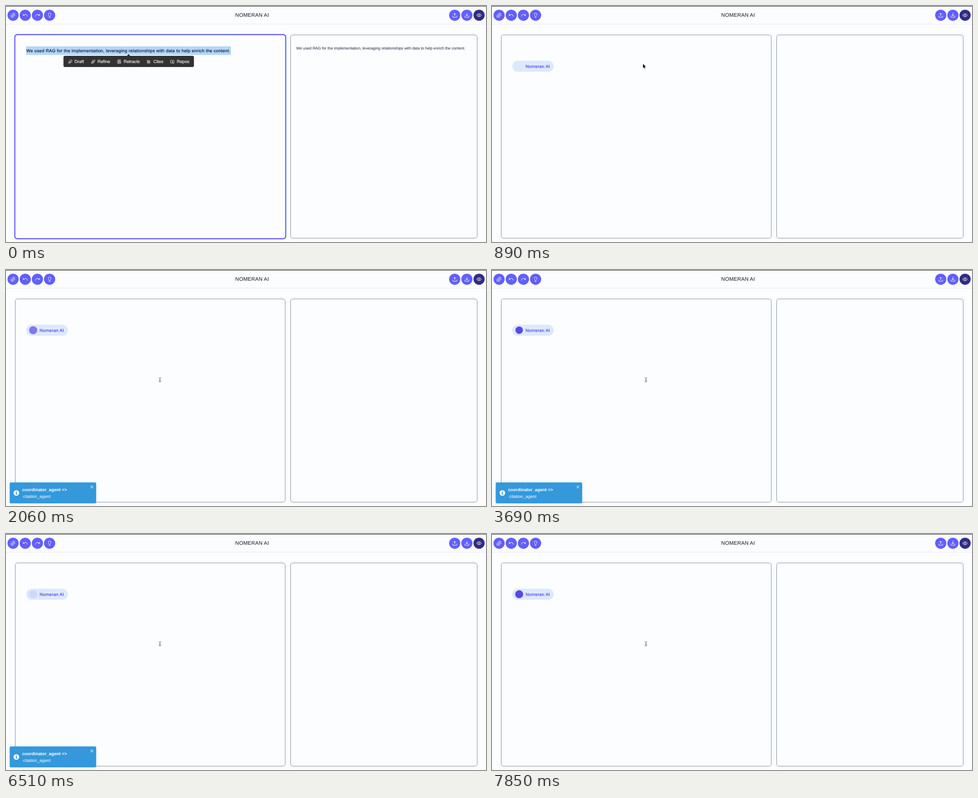
Write an HTML page with a canvas that moves like this. It is 1065 px wide and 526 px high and loops after 8 s.

```html
<!DOCTYPE html>
<html lang="en">
<head>
<meta charset="utf-8">
<title>Editor</title>
<style>
  html, body { margin: 0; width: 100%; height: 100%; overflow: hidden; background: #fbfdff; }
  canvas { display: block; }
</style>
</head>
<body>
<canvas id="stage" width="1065" height="526"></canvas>
<script>
const ctx = document.getElementById('stage').getContext('2d');
const LOOP = 8000, STEP = 148;
const FONT = '"Liberation Sans", Arial, sans-serif';
const INDIGO = '#615fff', SLATE = '#7c8aa1', PAPER = '#fbfdff';
const SENTENCE = 'We used RAG for the implementation, leveraging relationships with data to help enrich the content.';

// Line icons on a 24-unit grid
const ICONS = {
  clip: 'm21.4 11-9.2 9.2a6 6 0 0 1-8.5-8.5l8.6-8.5A4 4 0 1 1 18 8.8l-8.6 8.6a2 2 0 0 1-2.8-2.8l8.5-8.5',
  undo: 'M3 7v6h6M21 17a9 9 0 0 0-9-9 9 9 0 0 0-6 2.3L3 13',
  redo: 'M21 7v6h-6M3 17a9 9 0 0 1 9-9 9 9 0 0 1 6 2.3l3 2.7',
  bulb: 'M15 14c.2-1 .7-1.7 1.5-2.5 1-.9 1.5-2.2 1.5-3.5A6 6 0 0 0 6 8c0 1 .2 2.2 1.5 3.5.7.7 1.3 1.5 1.5 2.5M9 18h6M10 22h4',
  upload: 'M21 15v4a2 2 0 0 1-2 2H5a2 2 0 0 1-2-2v-4M17 8l-5-5-5 5M12 3v12',
  download: 'M21 15v4a2 2 0 0 1-2 2H5a2 2 0 0 1-2-2v-4M7 10l5 5 5-5M12 15V3',
  eye: 'M2 12a10.8 10.8 0 0 1 20 0 10.8 10.8 0 0 1-20 0M9 12a3 3 0 1 0 6 0 3 3 0 1 0-6 0',
  feather: 'M12.7 19a2 2 0 0 0 1.4-.6l6.1-6.2a6 6 0 0 0-8.5-8.5L5.6 9.9A2 2 0 0 0 5 11.3V19zM16 8 2 22M17.5 15H9',
  spark: 'M11 4l2 7 7 2-7 2-2 7-2-7-7-2 7-2zM20 2v5M22.5 4.5h-5M4 18v4M6 20H2',
  book: 'M4 19.5v-15A2.5 2.5 0 0 1 6.5 2H20v20H6.5a2.5 2.5 0 0 1 0-5H20M9.5 8a2.5 2.5 0 1 0 5 0 2.5 2.5 0 1 0-5 0M8 14a4 4 0 0 1 8 0',
  cite: 'M2 4l5 5M8 3l2 5M3 11h6M9 9l11-3-3 5 4 4H10zM8 14l-4 6h6l2-4M15 16l5 5M13 17v5',
  repo: 'M9 20H4a2 2 0 0 1-2-2V5a2 2 0 0 1 2-2h4l3 3h9a2 2 0 0 1 2 2v5M11 12a2 2 0 1 0 4 0 2 2 0 1 0-4 0M13 14v8M13 16c0 3 3 3 5 3M18 19a2 2 0 1 0 4 0 2 2 0 1 0-4 0'
};
for (const k in ICONS) ICONS[k] = new Path2D(ICONS[k]);

const ARROW = new Path2D('M0 0v9.2l2.1-2 1.5 3.3 1.5-.7-1.4-3.2h2.8z');
const HAND = new Path2D('M-1 .8Q0-.6 1 .8V5l4 .8q1.4.4 1.2 2L5.4 12H-.6L-4 7.4q.6-1.6 3 .4z');

ctx.textRendering = 'geometricPrecision';

function box(x, y, w, h, r, fill, stroke, line = 1) {
  ctx.beginPath();
  ctx.roundRect(x, y, w, h, r);
  if (fill) { ctx.fillStyle = fill; ctx.fill(); }
  if (stroke) { ctx.strokeStyle = stroke; ctx.lineWidth = line; ctx.stroke(); }
}

function disc(x, y, r, fill) {
  ctx.beginPath();
  ctx.arc(x, y, r, 0, Math.PI * 2);
  ctx.fillStyle = fill;
  ctx.fill();
}

function text(str, x, y, size, color, { spacing = 0, weight = 400, align = 'left', heavy = 0 } = {}) {
  ctx.font = `${weight} ${size}px ${FONT}`;
  ctx.letterSpacing = spacing + 'px';
  ctx.textAlign = align;
  ctx.fillStyle = color;
  ctx.fillText(str, x, y);
  if (heavy) {
    ctx.strokeStyle = color;
    ctx.lineWidth = heavy;
    ctx.strokeText(str, x, y);
  }
}

function icon(name, cx, cy, size, line = 2) {
  ctx.save();
  ctx.translate(cx - size / 2, cy - size / 2);
  ctx.scale(size / 24, size / 24);
  ctx.strokeStyle = '#fff';
  ctx.lineWidth = line;
  ctx.lineCap = ctx.lineJoin = 'round';
  ctx.stroke(ICONS[name]);
  ctx.restore();
}

function buttons(names, left) {
  names.forEach((name, i) => {
    const x = left + 27 * i;
    disc(x, 20.6, 12.4, name === 'eye' ? '#312c85' : INDIGO);
    icon(name, x, 20.6, 12);
  });
}

function header() {
  ctx.fillStyle = '#2e2e33';
  ctx.fillRect(0, 0, 1065, 1);
  ctx.fillStyle = '#e3e8f0';
  ctx.fillRect(0, 40, 1065, 1);
  buttons(['clip', 'undo', 'redo', 'bulb'], 15.7);
  buttons(['upload', 'download', 'eye'], 995.6);
  text('NOMERAN AI', 546, 24.3, 11.6, '#15171f', { spacing: 0.2, align: 'center' });
}

function panes(focused) {
  if (focused) box(19.6, 63.8, 601, 455, 5.5, null, INDIGO, 2.4);
  else box(20.5, 64.5, 599, 453, 5, null, SLATE);
  box(631.5, 64.5, 414, 453, 5, null, SLATE);
}

function menu(hover) {
  ctx.beginPath();
  ctx.moveTo(267.5, 112);
  ctx.lineTo(272, 107.2);
  ctx.lineTo(276.5, 112);
  ctx.fillStyle = '#333';
  ctx.fill();
  box(127.5, 111, 289.5, 25, 3.6, '#333');
  if (hover) box(307, 116, 47.5, 16, 2.5, `rgba(255,255,255,${0.16 * hover})`);
  const items = [['feather', 'Draft', 142.5, 152], ['spark', 'Refine', 193.5, 203],
    ['book', 'Retracts', 251, 261], ['cite', 'Cites', 316.5, 327], ['repo', 'Repos', 369, 379]];
  for (const [name, label, ix, tx] of items) {
    icon(name, ix, 124, 9.6);
    text(label, tx, 127.3, 9.66, '#fff', { heavy: 0.15 });
  }
}

function editing(t) {
  panes(true);
  ctx.fillStyle = '#b3d6fd';
  ctx.fillRect(45, 90, 454, 19);
  text(SENTENCE, 45, 103, 9.66, '#0b0d14', { spacing: 0.316, heavy: 0.15 });
  text(SENTENCE, 644, 97.4, 8.6, '#1d2436');
  menu(Math.min(1, t / 444));
  if (t >= STEP) pointer(HAND, 335, 129);
}

function pointer(path, x, y) {
  const hand = path === HAND;
  ctx.save();
  ctx.translate(x, y);
  ctx.lineJoin = 'round';
  ctx.lineWidth = 0.9;
  ctx.strokeStyle = hand ? '#111' : '#fff';
  ctx.fillStyle = hand ? '#fff' : '#111';
  ctx.stroke(path);
  ctx.fill(path);
  ctx.restore();
}

function beam(x, y) {
  ctx.beginPath();
  for (const side of [-2.5, 2.5]) {
    for (const end of [-1, 1]) {
      ctx.moveTo(x + side, y + 4.6 * end);
      ctx.quadraticCurveTo(x, y + 4.6 * end, x, y + 3 * end);
    }
  }
  ctx.moveTo(x, y - 3);
  ctx.lineTo(x, y + 3);
  ctx.moveTo(x - 1.5, y + 1.5);
  ctx.lineTo(x + 1.5, y + 1.5);
  ctx.strokeStyle = '#333';
  ctx.lineWidth = 0.8;
  ctx.stroke();
}

// The mark grows from its centre, then fades, every two seconds
function pill(t) {
  box(45, 122, 92, 24.5, 12.25, '#dce9fd');
  text('Nomeran AI', 74.5, 137.5, 9.66, '#432dd7', { spacing: 0.32, heavy: 0.1 });
  if (t < 1030) return;
  const p = ((t - 1032) % 2000) / 1000;
  const r = 0.6 + 8.4 * Math.sin(Math.min(1, p / 0.9) * Math.PI / 2);
  ctx.globalAlpha = p < 0.9 ? 1 : Math.max(0, (1.75 - p) / 0.85) ** 2;
  disc(60.3, 134.2, r, '#5a48e6');
  ctx.globalAlpha = 1;
}

function toast(dx) {
  ctx.save();
  ctx.translate(dx, 0);
  ctx.shadowColor = 'rgba(0,0,0,0.13)';
  ctx.shadowBlur = 7;
  ctx.shadowOffsetY = 0.8;
  box(8.3, 473.5, 191.7, 46.5, 2.4, '#3498db');
  ctx.shadowColor = 'transparent';
  disc(23, 497, 6.2, '#fff');
  ctx.fillStyle = '#3498db';
  ctx.fillRect(22.1, 493, 1.8, 1.7);
  ctx.fillRect(21.4, 495.8, 2.5, 1.2);
  ctx.fillRect(22.2, 495.8, 1.7, 4.6);
  ctx.fillRect(21.2, 499.3, 3.7, 1.2);
  text('coordinator_agent =>', 35.7, 492.8, 9.75, '#fff', { weight: 700 });
  text('citation_agent', 38, 507.8, 9.75, '#fff');
  ctx.beginPath();
  ctx.moveTo(187.7, 480.7); ctx.lineTo(193.3, 486.3);
  ctx.moveTo(193.3, 480.7); ctx.lineTo(187.7, 486.3);
  ctx.strokeStyle = '#d6ebf8';
  ctx.lineWidth = 1.1;
  ctx.stroke();
  ctx.restore();
}

function working(t) {
  panes(false);
  pill(t);
  if (t < 1030) {
    pointer(ARROW, 335, 129);
  } else {
    const k = Math.min(1, (t - 888) / 592);
    const e = k * k * (3 - 2 * k);
    beam(335 + 6.6 * e, 134 + 110.8 * e);
  }
  if (t >= 1332 && t < 7690) toast(t < 1480 || t >= 7540 ? 13 : 0);
}

function draw(now) {
  const t = Math.min(53, Math.floor((now % LOOP + 12) / STEP)) * STEP;
  ctx.fillStyle = PAPER;
  ctx.fillRect(0, 0, 1065, 526);
  header();
  if (t < 740) editing(t);
  else working(t);
}

let start;
function tick(now) {
  start ??= now;
  draw(now - start);
  requestAnimationFrame(tick);
}
requestAnimationFrame(tick);
</script>
</body>
</html>
```
